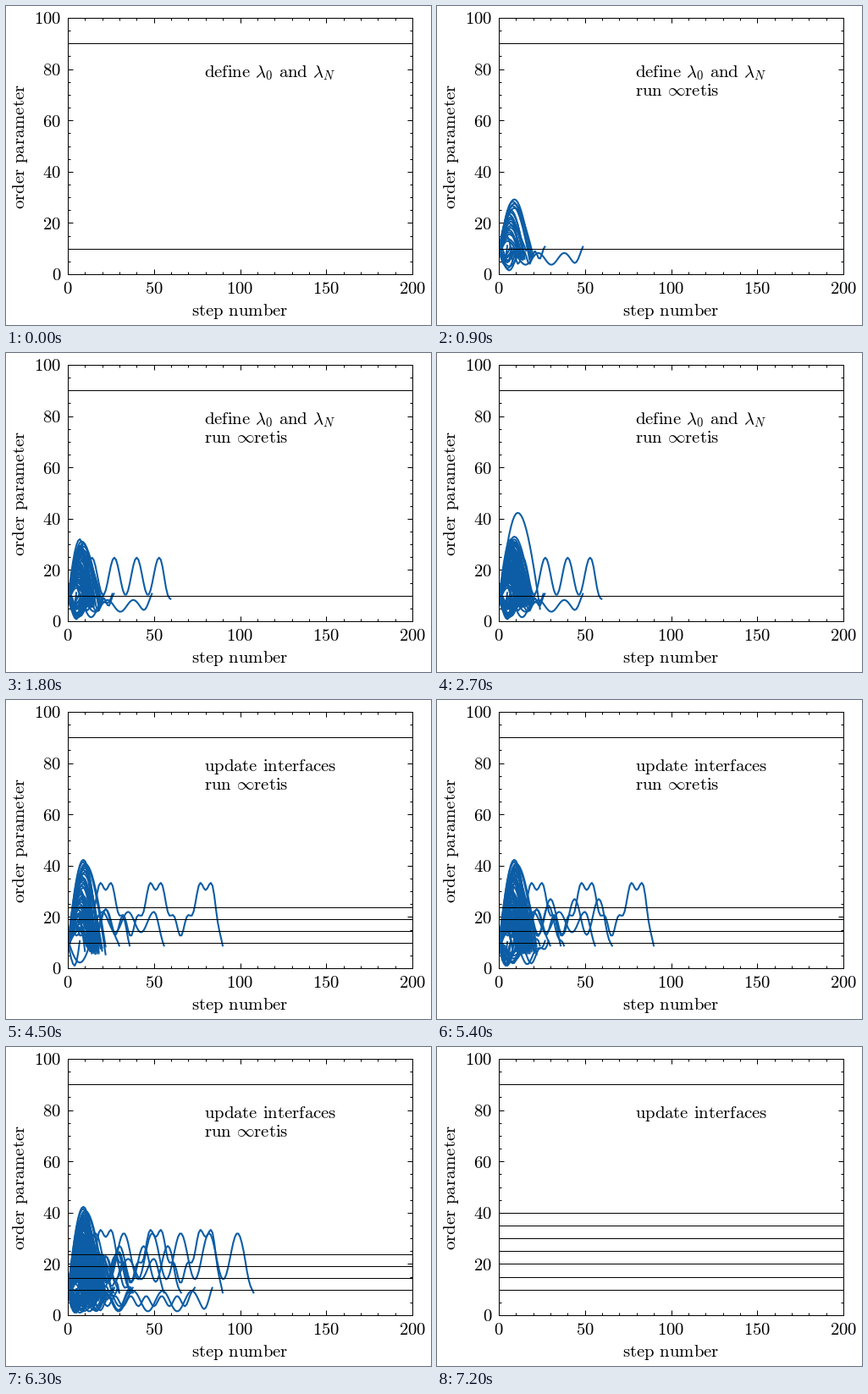
Write a matplotlib script that moves like this. It is 502 by 377 pixels and loops after 8000 ms.

```python
import numpy as np
import matplotlib.pyplot as plt
from matplotlib.animation import FuncAnimation
from matplotlib.collections import LineCollection
from matplotlib.ticker import MultipleLocator

W, H, DPI = 502, 377, 144
LEFT, RIGHT, TOP, BOTTOM = 73, 480, 14, 317
BLUE = "#0C5DA5"
FRAMES, INTERVAL, HOLD = 80, 100, 9  # HOLD: frames per stage

plt.rcParams["mathtext.fontset"] = "cm"
rng = np.random.default_rng(12)


def roman(words):
    """Set words upright in Computer Modern; words with a backslash stay math."""
    parts = [w if "\\" in w else r"\mathrm{%s}" % w for w in words.split()]
    return "$" + r"\hspace{0.38}".join(parts) + "$"


def put(x, y, text, **style):
    """Place text with its baseline at pixel (x, y), counted from the top left."""
    style = {"va": "baseline", "size": 10.375, **style}
    return fig.text(x / W, 1 - y / H, text, **style)


def arc(start, turn, stop, mid, end):
    """Single excursion that turns back at step mid."""
    x = np.arange(end + 1)
    rise = start + (turn - start) * np.sin(np.pi / 2 * x / mid)
    fall = turn + (stop - turn) * (1 - np.cos(np.pi / 2 * (x - mid) / (end - mid)))
    return np.column_stack([x, np.where(x < mid, rise, fall)])


def wave(end, mean, amp, period, crest, ripple=0):
    """Long path that swings about mean and has both ends near the first interface."""
    x = np.arange(end + 1)
    phase = 2 * np.pi * (x - crest) / period
    y = mean + amp * np.cos(phase) - ripple * np.cos(4 * phase)
    edge = 8.5 if mean > 10 else 11
    ramp = np.sin(np.pi / 2 * np.clip(np.minimum(x / 7, (end - x) / 6), 0, 1))
    return np.column_stack([x, edge + (y - edge) * ramp])


def humps(n, low, high):
    """Excursions that start and end below the first interface."""
    paths = []
    for peak in np.linspace(low, high, n):
        mid = int(round(3.8 + 0.15 * peak + rng.uniform(-1.5, 1)))
        end = 2 * mid + rng.integers(-2, 3)
        paths.append(arc(rng.uniform(6, 9.8), peak, rng.uniform(5, 9.5), mid, end))
    return paths


def dips(n, low, high, longest=9):
    """Excursions that start and end above the first interface."""
    paths = []
    for depth in np.linspace(low, high, n):
        mid = rng.integers(3, longest)
        end = 2 * mid + rng.integers(-1, 2)
        paths.append(arc(rng.uniform(10.2, 12.5), depth, rng.uniform(10.2, 12), mid, end))
    return paths


def rovers(n, mean, amp, longest):
    """Random mid-length waves."""
    return [wave(rng.integers(20, longest), mean + rng.uniform(-1, 1), amp,
                 rng.uniform(8, 14), rng.uniform(0, 14)) for _ in range(n)]


# Paths by stage; each group stays until the interfaces are updated.
paths = {
    1: humps(20, 13, 29.2) + dips(8, 1.5, 7, 7)
       + [wave(27, 6.5, 2.5, 6.5, 21), wave(49, 6, 2.3, 15, 23)],
    2: humps(22, 14, 32) + dips(10, 0.8, 6) + rovers(2, 5, 3, 27)
       + [wave(60, 17.5, 7.3, 13, 27)],
    3: humps(18, 15, 33) + dips(6, 5, 7) + [arc(7, 42.3, 4.5, 11, 24)],
    5: humps(36, 15, 42.3) + dips(2, 1, 2.2)
       + [wave(90, 24, 9, 29, 51, ripple=2.5), wave(56, 18, 4, 15, 20),
          wave(36, 18, 5, 11, 22), wave(30, 19, 4, 12, 22)],
    6: humps(28, 14, 38.8) + dips(10, 1, 6) + rovers(3, 18, 6, 40)
       + rovers(2, 5.5, 3, 32) + [wave(66, 20, 7, 14, 58)],
    7: humps(28, 14, 37.3) + dips(10, 1, 6, 11) + rovers(4, 18, 6, 42)
       + rovers(4, 5.5, 3, 42)
       + [wave(108, 23, 9, 16.5, 49), wave(74, 5.5, 2, 9, 63.5),
          wave(84, 5.5, 4, 17, 55)],
}
interfaces = [(10, 90), (*np.linspace(10, 23.75, 4), 90), (*range(10, 41, 5), 90)]

fig = plt.figure(figsize=(W / DPI, H / DPI), dpi=DPI, facecolor="white")
ax = fig.add_axes([LEFT / W, 1 - BOTTOM / H, (RIGHT - LEFT) / W, (BOTTOM - TOP) / H])
ax.set(xlim=(0, 200), ylim=(0, 100))
for axis, major, minor in ((ax.xaxis, 50, 10), (ax.yaxis, 20, 5)):
    axis.set_major_locator(MultipleLocator(major))
    axis.set_minor_locator(MultipleLocator(minor))
ax.tick_params(which="both", direction="in", top=True, right=True, width=0.5,
               labelbottom=False, labelleft=False)
ax.tick_params(which="major", length=3)
ax.tick_params(which="minor", length=1.5)
for spine in ax.spines.values():
    spine.set_linewidth(0.5)

for v in range(0, 201, 50):
    put(LEFT + v * (RIGHT - LEFT) / 200, 340, f"${v}$", ha="center")
for v in range(0, 101, 20):
    put(65, BOTTOM - v * (BOTTOM - TOP) / 100 + 7.4, f"${v}$", ha="right")
put(276, 366, roman("step number"), ha="center")
put(22.5, 166, roman("order parameter"), ha="center", rotation=90,
    rotation_mode="anchor")

define = put(234.4, 84, roman(r"define \lambda_0 and \lambda_N"))
renew = put(234.4, 84, roman("update interfaces"))
run = put(234.4, 106, roman(r"run \infty\mathrm{retis}"))

bundles = {k: ax.add_collection(LineCollection(p, colors=BLUE, linewidths=1.04, zorder=2),
                                autolim=False)
           for k, p in paths.items()}
levels = [[ax.axhline(y, color="black", lw=0.5, zorder=2.4) for y in ys]
          for ys in interfaces]


def update(frame):
    cycle, step = divmod(frame // HOLD, 4)
    for k, bundle in bundles.items():
        bundle.set_visible(k // 4 == cycle and k % 4 <= step)
    for i, lines in enumerate(levels):
        for line in lines:
            line.set_visible(i == cycle)
    define.set_visible(cycle == 0)
    renew.set_visible(cycle > 0)
    run.set_visible(step > 0)
    return []


anim = FuncAnimation(fig, update, frames=FRAMES, interval=INTERVAL,
                     repeat=True, repeat_delay=0, blit=False)
plt.show()
```
